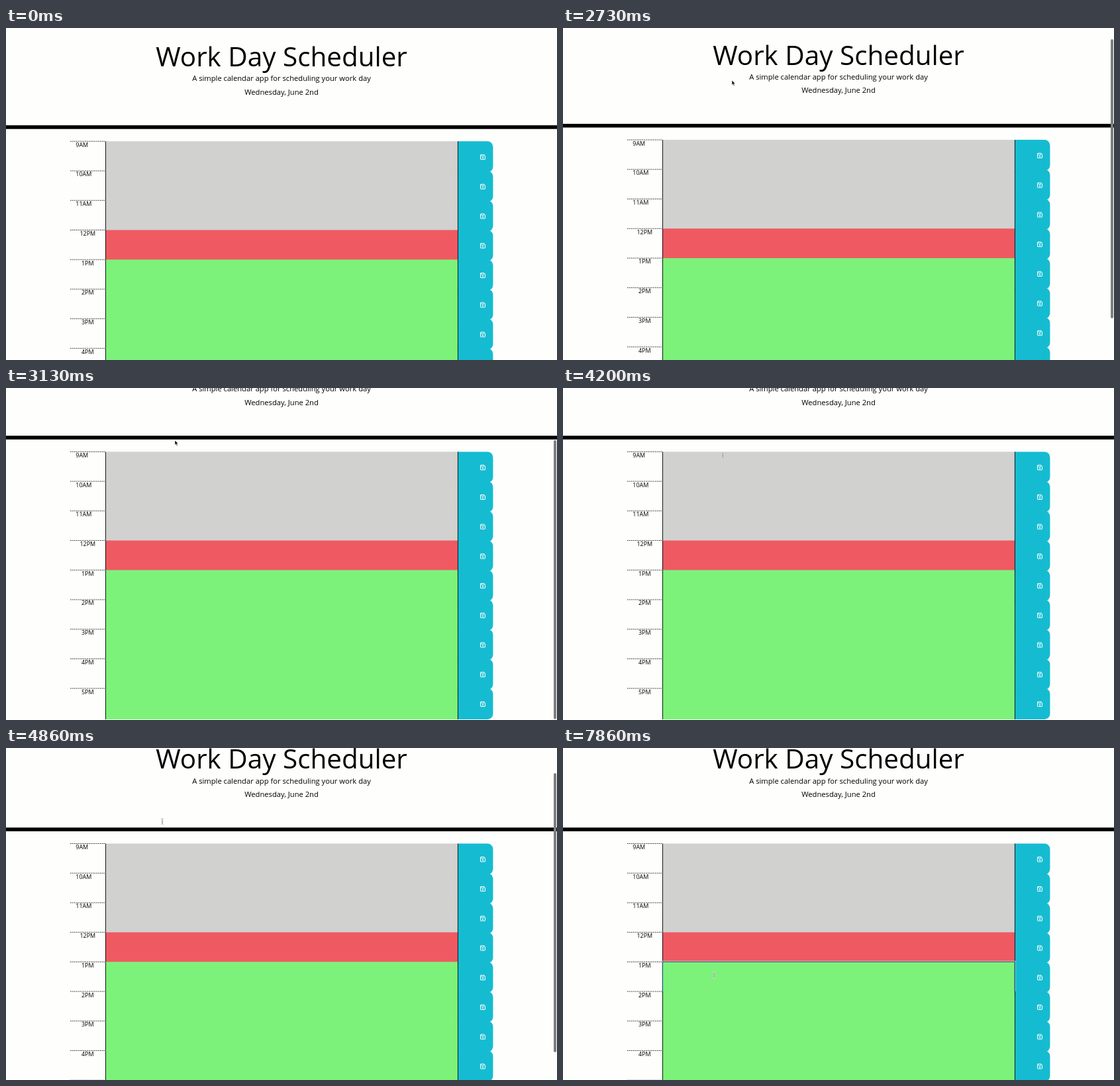
An HTML page that plays this animation: 832x502 px, repeating every 8 s.

```html
<!DOCTYPE html>
<html lang="en">
<head>
<meta charset="utf-8">
<title>Work Day Scheduler</title>
<style>
  html, body { margin: 0; width: 100%; height: 100%; overflow: hidden; background: #fefefd; }
  svg { display: block; width: 832px; height: 502px; }
  text { font-family: "Open Sans", "Noto Sans", sans-serif; fill: #000; }
  .mid { text-anchor: middle; }
  .lead { font-size: 11.2px; }
  .hour { font-size: 8.96px; }
  .icon { fill: none; stroke: #fff; stroke-width: 1; stroke-linejoin: round; }
</style>
</head>
<body>
<svg viewBox="0 0 832 502">
  <g id="page">
    <text class="mid" x="416" y="58.3" font-size="40.4">Work Day Scheduler</text>
    <text class="mid lead" x="416" y="80.4">A simple calendar app for scheduling your work day</text>
    <text class="mid lead" x="416" y="100.6">Wednesday, June 2nd</text>
    <rect y="147.1" width="832" height="5.6"/>
    <g id="rows"></g>
  </g>
  <rect id="bar" x="827" width="4" height="422" rx="2" fill="#7e7e7e"/>
  <path id="arrow" d="M0 0V7.2L1.7 5.7L2.9 8.5L4.1 8L2.9 5.3H5.1Z" fill="#111" stroke="#fff" stroke-width=".5"/>
  <g id="beam" fill="none" stroke-linecap="round">
    <path d="M-1.5 -4.4Q0 -4.4 0 -3V3Q0 4.4 -1.5 4.4M1.5 -4.4Q0 -4.4 0 -3V3Q0 4.4 1.5 4.4M-1 .8H1" stroke="#fff" stroke-opacity=".7" stroke-width="1.5"/>
    <path d="M-1.5 -4.4Q0 -4.4 0 -3V3Q0 4.4 -1.5 4.4M1.5 -4.4Q0 -4.4 0 -3V3Q0 4.4 1.5 4.4M-1 .8H1" stroke="#8c8c8c" stroke-width=".6"/>
  </g>
</svg>
<script>
const LOOP = 8000, TOP = 171.3, PITCH = 44.72, HEIGHT = 46.9;
const GRAY = '#d1d1cf', RED = '#ef5a62', GREEN = '#7df27a', TEAL = '#15bcd1';
const hours = ['9AM', '10AM', '11AM', '12PM', '1PM', '2PM', '3PM', '4PM', '5PM'];
const $ = id => document.getElementById(id);

function row(label, i) {
  const fill = i < 3 ? GRAY : i === 3 ? RED : GREEN;
  const x = i < 3 ? 105.3 : i === 3 ? 111.4 : 114;
  const focus = i !== 4 ? '' : `
    <g id="focus" fill="none">
      <rect x="149.4" y="-1.1" width="533.6" height="49" stroke="#fff" stroke-opacity=".7" stroke-width=".9"/>
      <rect x="150.3" y="0" width="531.8" height="47" stroke="#1b5f93" stroke-width="1.1"/>
    </g>
    <rect id="caret" x="158.6" y="3" width="1" height="12.5" fill="#fff"/>`;
  return `<g transform="translate(0 ${TOP + i * PITCH})">
    <path d="M97 0H150" stroke="#000" stroke-width=".8" stroke-dasharray="1.7 1.1"/>
    <text class="hour" x="${x}" y="8.4">${label}</text>
    <rect x="150.1" width="532.3" height="${HEIGHT}" fill="${fill}"/>
    <path d="M682.4 0H727a8.4 8.4 0 0 1 8.4 8.4V${HEIGHT - 8.4}a8.4 8.4 0 0 1 -8.4 8.4H682.4Z" fill="${TEAL}"/>
    <path d="M150.5 0V${HEIGHT}M682.4 0V${HEIGHT}" stroke="#000" stroke-width=".9"/>
    <g class="icon" transform="translate(716 19.8)">
      <path d="M1 .5H5.9L7.5 2.1V7.1Q7.5 7.6 7 7.6H1Q.5 7.6 .5 7.1V1Q.5 .5 1 .5Z"/>
      <path d="M2 .8V2.9H5.5V.8" stroke-width=".8"/>
      <circle cx="4" cy="5.2" r="1" stroke-width=".8"/>
    </g>${focus}
  </g>`;
}
$('rows').innerHTML = hours.map(row).join('');

// [time, values...]
const scroll = [[0, 0], [2730, 2.2], [2860, 18], [2930, 40], [3030, 64], [3130, 74.9],
  [4530, 74], [4600, 73], [4660, 70], [4730, 57], [4800, 40], [4860, 26.8]];
const barAlpha = [[0, 0], [2729, 0], [2730, 1], [3530, 1], [3760, 0], [4399, 0],
  [4400, 1], [5260, 1], [5500, 0]];
const pointer = [[0, 255, 79], [3800, 255, 79], [4060, 247, 92], [4330, 236, 111],
  [5330, 236, 111], [5530, 233, 205], [5800, 229, 318], [6000, 228, 336],
  [6330, 227, 344.5], [6730, 227, 344.5], [7000, 228, 343.5]];

const held = (keys, t) => keys.filter(k => k[0] <= t).pop()[1];

function tween(keys, t, n = 1) {
  const i = keys.findIndex(k => k[0] > t);
  if (i < 0) return keys[keys.length - 1][n];
  const a = keys[i - 1], b = keys[i];
  return a[n] + (b[n] - a[n]) * (t - a[0]) / (b[0] - a[0]);
}

const show = (id, on) => $(id).setAttribute('visibility', on ? 'visible' : 'hidden');

function draw(t) {
  const y = held(scroll, t);
  $('page').setAttribute('transform', `translate(0 ${-y})`);
  $('bar').setAttribute('y', 15.2 + y * 0.85);
  $('bar').setAttribute('opacity', tween(barAlpha, t));
  const at = `translate(${tween(pointer, t, 1)} ${tween(pointer, t, 2)})`;
  $('arrow').setAttribute('transform', at);
  $('beam').setAttribute('transform', at);
  show('arrow', t >= 1930 && t < 4060);
  show('beam', t >= 4060);
  show('focus', t >= 6330);
  show('caret', t >= 6330 && t < 6930 || t >= 7400 && t < 7860);
}

function tick() {
  draw(performance.now() % LOOP);
  requestAnimationFrame(tick);
}
tick();
</script>
</body>
</html>
```
